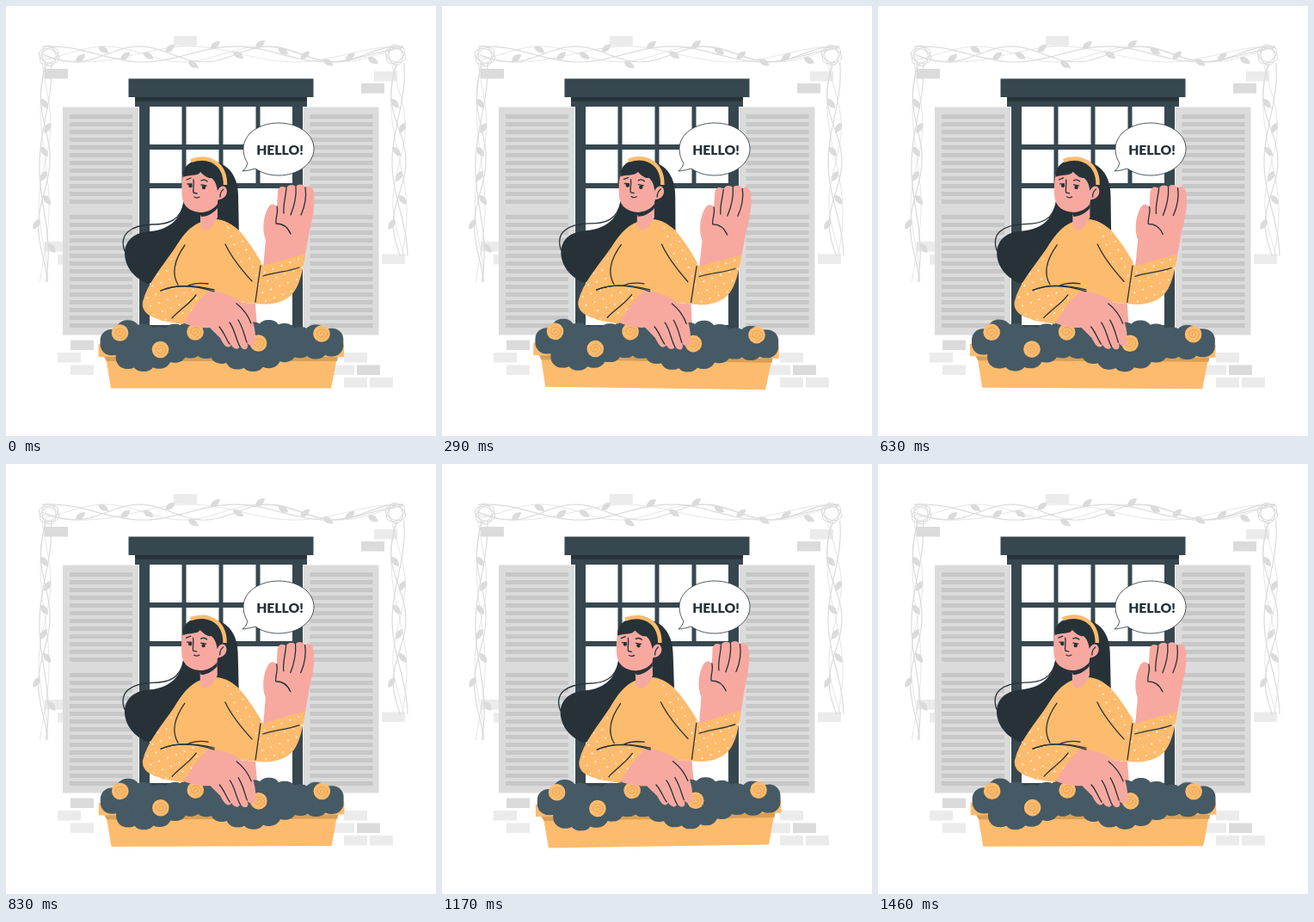
Write an HTML page that moves like this. It is 500 px wide and 500 px high and loops after 1500 ms.

```html
<!DOCTYPE html>
<html>
<head>
<meta charset="utf-8">
<style>
html, body { margin: 0; width: 100%; height: 100%; overflow: hidden; background: #fff; }
svg { display: block; width: 100%; height: 100%; }
.line { fill: none; stroke: #263238; stroke-width: 1.3; stroke-linecap: round; stroke-linejoin: round; }
.vine { fill: none; stroke: #dbdbdb; }
.dark { fill: #263238; }
.frame { fill: #37474f; }
.skin { fill: #f7a9a0; }
.cloth { fill: #fdbb6d; }
.bush { fill: #455a64; }
.leaf { fill: #dbdbdb; }
</style>
</head>
<body>
<svg viewBox="0 0 500 500">
  <defs>
    <pattern id="dots" width="15" height="15" patternUnits="userSpaceOnUse" patternTransform="rotate(24)">
      <circle cx="3" cy="3" r=".9" fill="#fff"/>
      <circle cx="10.5" cy="10.5" r=".9" fill="#fff"/>
    </pattern>
  </defs>
  <g id="wall"></g>
  <g id="garland"></g>
  <g id="shutters"></g>
  <path class="frame" d="M150 106H350V117H345V382H155V117H150ZM167 117V371H333V117Z" fill-rule="evenodd"/>
  <g id="bars"></g>
  <path class="dark" d="M150 106H350V110.500H150Z"/>
  <path class="frame" d="M142.500 84.500H357.500V106H142.500Z"/>

  <g id="sway">
    <path class="dark" d="M215 190C240 170 270 185 270 220L271 270L215 310L165 323C150 317 138 304 138 287C139 270 152 263 168 262C190 260 206 247 207 222Z"/>
    <path class="line" d="M207 228C203 249 190 254 170 254C145 255 131 265 138 285"/>

    <path class="skin" d="M299 304L302 272C297 259 300 244 304 236C307 229 313 229 315 234L316 216C317 209 323 209 326 212C328 207 334 207 337 210C340 206 346 207 348 211C352 207 358 211 358 218C360 232 356 249 353 261L347 295Z"/>
    <path class="line" d="M326 212C325 223 322 231 323 241M337 210C338 223 335 233 331 243M348 211C350 224 347 234 343 243M315 233C317 240 313 247 314 253C322 253 328 258 331 265"/>

    <path class="cloth" d="M227 251C213 256 204 269 196 282C181 304 164 323 159 344C157 356 168 363 186 366L215 371H274L270 344L291 346C313 349 330 342 337 329C343 319 346 302 348 288L299 302C291 287 280 271 270 260C262 253 253 248 244 248Z"/>
    <path class="skin" d="M266 344L290 346L292 374H266Z"/>
    <path fill="url(#dots)" d="M246 250C270 256 287 278 299 302L348 288C345 318 335 338 313 346L291 344L286 319L262 280ZM194 288C178 308 164 325 160 343C160 357 171 361 190 364L235 330L200 325Z"/>
    <path class="line" d="M208 278C198 292 191 309 200 324M180 331C199 323 221 325 242 330M210 326C218 322 228 322 235 323M255 277C263 294 275 308 286 320M296 302L290 344M299 314C315 309 328 309 341 304"/>

    <path class="skin" d="M226 230V253C227 262 234 263 240 256L246 246V222Z"/>
    <path class="dark" d="M225 240C235 240 242 236 246 230V235C240 242 233 245 227 245Z"/>
    <path class="skin" d="M206 196C204 205 204 216 205 224C207 234 215 239 226 240C237 239 244 233 247 225C254 225 259 218 256 212C254 208 249 209 247 213L244 193L227 183Z"/>
    <path class="dark" d="M206 199C205 187 214 179 230 177C247 177 256 192 256 209C250 207 248 211 246 215C245 208 243 203 239 200C235 201 230 197 226 193C224 198 213 196 206 199Z"/>
    <path fill="none" stroke="#fdbb6d" stroke-width="4.500" d="M215 180C235 173 255 182 255 208"/>
    <path class="line" d="M210 202L215 200M227 203Q231 201 234 204M218 202C219 209 217 213 218 217L222 218M219 222Q222 224 225 222M253 213C250 215 249 219 249 222M211 207L216 207M227 208L233 209"/>
    <circle class="dark" cx="214.500" cy="209" r="2.200"/>
    <circle class="dark" cx="230" cy="211" r="2.200"/>

    <path class="cloth" d="M107.500 393.500H393V408H385L378 444.500H122L116 408H107.500Z"/>
    <path d="M114 408H386L385 413H117Z" fill="#d99f56"/>
    <g id="bush" class="bush"></g>
    <g id="roses"></g>

    <path class="skin" d="M195 363L231 331C252 332 265 336 276 347C287 360 291 377 290 391C288 397 282 395 280 391C284 400 276 402 272 395C271 401 264 399 262 394C257 401 252 392 249 386L237 374C226 375 210 372 195 363Z"/>
    <path class="cloth" d="M166 353L207 329L236 331C223 342 214 356 206 370L181 366Z"/>
    <path fill="url(#dots)" d="M166 352L207 329L234 331L206 368L181 365Z"/>
    <path class="line" d="M193 363C202 353 213 347 221 336M180 331C199 323 221 325 242 332M248 373C254 380 256 388 260 393M260 368C266 376 267 387 272 396M270 365C276 375 277 383 280 391M268 346C277 353 282 361 285 369"/>
  </g>

  <path d="M281 183Q279 190 275 192Q284 191 290 189C297 194 306 197 317 197C340 197 358 183 358 166S340 136 317 136 276 149 276 166C276 173 278 178 281 183Z" fill="#fff" stroke="#263238" stroke-width=".8"/>
  <text x="318.500" y="173" text-anchor="middle" font-family="Lato, sans-serif" font-weight="900" font-size="15.700" fill="#263238">HELLO!</text>
</svg>
<script>
const find = id => document.getElementById(id);
const repeat = (n, make) => Array.from({ length: n }, (_, i) => make(i)).join("");
const rect = (x, y, w, h, fill, rx = 0) =>
  `<rect x="${x}" y="${y}" width="${w}" height="${h}" rx="${rx}" ${fill ? `fill="${fill}"` : ""}/>`;

// Every fourth brick is darker.
const bricks = [[45, 73], [195, 35], [428, 76], [45, 274], [413, 90], [60, 289], [437, 288.5], [60, 403],
  [75, 388.5], [75, 417.5], [393, 403], [378, 417.5], [408, 417.5], [393, 432], [423, 432]];
find("wall").innerHTML = bricks.map(([x, y], i) => rect(x, y, 27, 11.5, i % 4 ? "#ebebeb" : "#dbdbdb")).join("");

const shutter = x => rect(x, 117.5, 88, 265, "#dbdbdb") +
  repeat(28, i => i === 12 ? "" : rect(x + 8, 126 + i * 9, 73, 5, "#c7c7c7"));
find("shutters").innerHTML = shutter(66) + shutter(345.5);

find("bars").innerHTML =
  repeat(3, i => rect(204.5 + i * 43, 117, 5, 90, "#37474f")) +
  repeat(2, i => rect(167, 161 + i * 45, 166, 6, "#37474f"));

// A bundle of wavy strands growing along the x axis, with leaves on alternating sides.
function vine(place, length, amp, leafCount) {
  const wave = (x, k) => amp * Math.sin(x / (24 + 5 * k) + k * 2.2);
  const strand = k => {
    const points = repeat(Math.ceil(length / 5) + 1, i => `${i * 5},${wave(i * 5, k).toFixed(1)} `);
    return `<polyline class="vine" stroke-width="${k % 2 ? .7 : 1.2}" points="${points}"/>`;
  };
  const leaf = i => {
    const x = length * (i + 1.5) / (leafCount + 2), side = i % 2 ? 35 : -35;
    return `<path class="leaf" d="M0 0C3-5 9-5 14-1C9 4 4 4 0 0Z" transform="translate(${x} ${wave(x, i % 4)}) rotate(${side})"/>`;
  };
  return `<g transform="${place}">${repeat(4, strand)}${repeat(leafCount, leaf)}</g>`;
}
const knot = (x, y) => repeat(3, i =>
  `<ellipse class="vine" cx="${x}" cy="${y}" rx="12" ry="8" transform="rotate(${i * 60 + 20} ${x} ${y})"/>`);
find("garland").innerHTML =
  vine("translate(42 56)", 418, 9, 14) +
  vine("translate(47 66) rotate(91)", 252, 6, 7) +
  vine("translate(455 66) rotate(89)", 224, 8, 6) +
  knot(50, 58) + knot(453, 57);

// Overlapping rounded columns whose tops and bottoms follow two waves.
find("bush").innerHTML = repeat(15, i => {
  const x = 123.5 + i * 18.2, edge = i % 14 ? 0 : 9;
  const top = 369 - 4 * Math.cos((x - 137) / 13.2) + edge;
  const bottom = 417 + 8 * Math.cos((x - 285) / 20) - edge;
  return rect(x - 14, top, 28, bottom - top, "", 13);
});

const roses = [[132.5, 380], [179.5, 399.5], [220, 379], [293.5, 392], [367, 381]];
find("roses").innerHTML = roses.map(([x, y]) => `<g transform="translate(${x} ${y})">
  <circle class="cloth" r="9.800"/>
  <path d="M-1 1C-3-2 2-4 3 0S-3 5-5 1-1-7 4-4 6 5 1 7" fill="none" stroke="#d99f56" stroke-width=".8"/></g>`).join("");

// Triangle wave: up to 1 degree at a quarter, down to -1 at three quarters.
const swayAngle = p => 1 - Math.abs(2 - 4 * ((p + .25) % 1)) === 0 ? 0 : 1 - Math.abs(2 - 4 * ((p + .25) % 1));

const LOOP = 1500, STEPS = 36, start = performance.now();
function draw(now) {
  const t = Math.max(0, now - start) % LOOP;
  const step = Math.floor((t + 5) * STEPS / LOOP) % STEPS;
  find("sway").setAttribute("transform", `rotate(${swayAngle(step / STEPS)} 249.5 310)`);
  requestAnimationFrame(draw);
}
draw(start);
</script>
</body>
</html>
```
